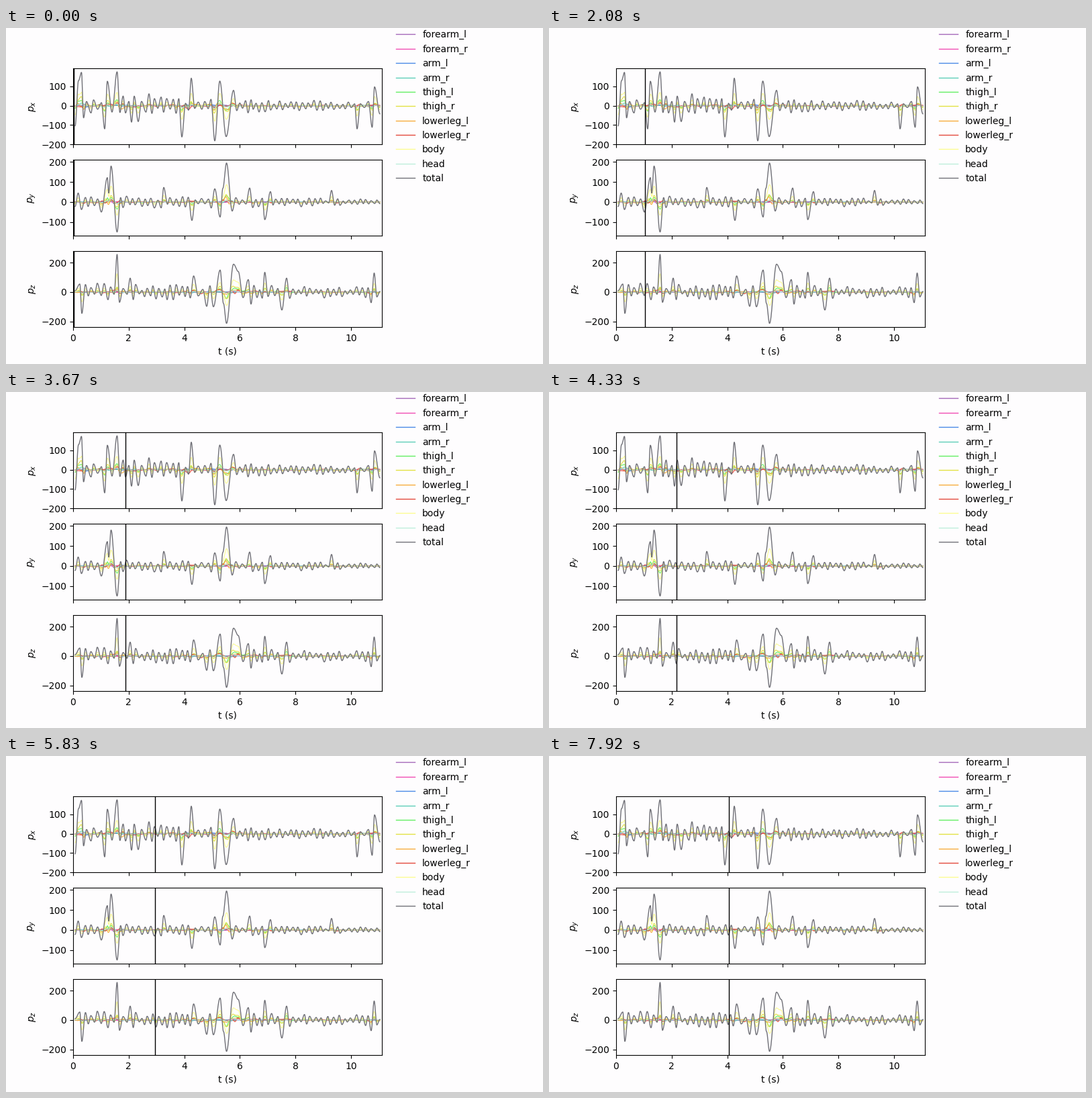
A matplotlib script for the animation above (8000 ms loop, 800 px wide and 500 px high).

```python
import numpy as np
import matplotlib.pyplot as plt
from matplotlib.animation import FuncAnimation
from matplotlib.lines import Line2D

plt.rcParams["font.family"] = "DejaVu Sans"

W, H, DPI = 800, 500, 100
FRAMES = 96
PX_PER_S = 41.4
PAPER = "#fefdfe"
TOTAL = "#707077"

# name, colour, share of the total signal, own wiggle
PARTS = [
    ("forearm_l", "#a468ba", 0.01, 1.5),
    ("forearm_r", "#f04cb4", 0.01, 1.5),
    ("arm_l", "#4a8ae6", 0.02, 2.5),
    ("arm_r", "#5ccfb8", 0.03, 2.5),
    ("thigh_l", "#62ee62", 0.14, 4),
    ("thigh_r", "#e2e244", 0.18, 4),
    ("lowerleg_l", "#f7ac3c", 0.06, 5),
    ("lowerleg_r", "#e4493c", 0.02, 5),
    ("body", "#fcfc92", 0.45, 3),
    ("head", "#bdeedb", 0.05, 2),
]

# strongest peaks: pixels from the left spine, value
PEAKS_X = [
    (3, -104), (8, 130), (12.5, 173), (15.5, -63), (47, -120), (51, 127),
    (65.5, 176), (87, -85), (97, -82), (113, 62), (162, -162), (176, 143),
    (211, -182), (218.5, 128), (228, -160), (239, 80), (423, -120),
    (445.5, -112), (449, 98), (457, -42),
]
PEAKS_Y = [
    (3, -22), (42, -50), (51, 122), (53, 45), (56.5, 180), (65.5, -150),
    (135, 73), (177, -92), (211, 66), (219, -75), (223, 68), (228.5, 195),
    (237, -45), (263, 70), (285.5, -88), (294, 52), (385, 58), (457, -8),
]
PEAKS_Z = [
    (3, 10), (10, 55), (13, -145), (65.5, 257), (69, -70), (85, 95),
    (179.5, 110), (199, -97), (209, -100), (219, 150), (224, -78),
    (228.5, -213), (239, 190), (246, 140), (261, 85), (265, -82),
    (285.5, 135), (311, -122), (318, 95), (444, -72), (448.5, 130), (457, 4),
]


def fill_gaps(peaks, ripple, rng):
    """Put alternating ripples, fading with time, between the strong peaks."""
    out = [peaks[0]]
    for (x0, v0), (x1, v1) in zip(peaks, peaks[1:]):
        extra = int((x1 - x0) / 4.1) - 1
        same_sign = (v0 > 0) == (v1 > 0)
        if (extra % 2 == 1) != same_sign:
            extra -= 1
        sign = -1 if v0 > 0 else 1
        for k in range(1, extra + 1):
            x = x0 + (x1 - x0) * (k + rng.uniform(-0.2, 0.2)) / (extra + 1)
            size = np.interp(x, (0, 457), ripple)
            out.append((x, sign * size * rng.uniform(0.2, 1)))
            sign = -sign
        out.append((x1, v1))
    return np.array(out)


def ease_between(points, x):
    """Smooth curve whose turning points are the given points."""
    px, pv = points.T
    i = np.clip(np.searchsorted(px, x, side="right") - 1, 0, len(px) - 2)
    u = (x - px[i]) / (px[i + 1] - px[i])
    return pv[i] + (pv[i + 1] - pv[i]) * (1 - np.cos(np.pi * u)) / 2


def wiggle(x, rng):
    knots = np.arange(x[0] - 5, x[-1] + 10, 4.5)
    return ease_between(np.column_stack([knots, rng.normal(0, 1, len(knots))]), x)


def draw_panel(ax, letter, peaks, ripple, ylim, ticks, seed):
    rng = np.random.default_rng(seed)
    x = np.linspace(3, 457, 1400)
    t = x / PX_PER_S
    total = ease_between(fill_gaps(peaks, ripple, rng), x)
    activity = np.convolve(np.abs(total), np.ones(60) / 60, mode="same") / 40
    for _, color, share, noise in PARTS:
        y = share * total + noise * np.minimum(activity, 1.8) * wiggle(x, rng)
        ax.plot(t, y, color=color, lw=0.8)
    ax.plot(t, total, color=TOTAL, lw=1)
    ax.set_ylim(*ylim)
    ax.set_yticks(ticks)
    ax.set_ylabel(f"$p_{letter}$")
    ax.set_facecolor(PAPER)


def draw_legend(fig):
    rows = [(name, color) for name, color, *_ in PARTS] + [("total", TOTAL)]
    for k, (name, color) in enumerate(rows):
        y = 9.4 + 21.37 * k
        fig.add_artist(Line2D([581.2 / W, 609 / W], [1 - y / H] * 2,
                              color=color, lw=1))
        fig.text(620.2 / W, 1 - (y + 4.9) / H, name, fontsize=10,
                 va="baseline")


fig, axes = plt.subplots(3, 1, sharex=True, figsize=(W / DPI, H / DPI),
                         dpi=DPI, facecolor=PAPER)
fig.subplots_adjust(left=0.125, right=0.7, bottom=0.11, top=0.88, hspace=0.2)
draw_panel(axes[0], "x", PEAKS_X, (58, 22), (-200.5, 194),
           range(-200, 101, 100), seed=3)
draw_panel(axes[1], "y", PEAKS_Y, (46, 16), (-168.5, 212),
           range(-100, 201, 100), seed=8)
draw_panel(axes[2], "z", PEAKS_Z, (62, 38), (-238, 280),
           range(-200, 201, 200), seed=5)
axes[2].set_xlim(0, 460 / PX_PER_S)
axes[2].set_xticks(range(0, 11, 2))
axes[2].set_xlabel("t (s)")
draw_legend(fig)
cursors = [ax.axvline(0, color="black", lw=1, zorder=5) for ax in axes]


def update(i):
    t = (0.5 + 1.764 * i) / PX_PER_S
    for line in cursors:
        line.set_xdata([t, t])
    return cursors


anim = FuncAnimation(fig, update, frames=FRAMES, interval=8000 / FRAMES,
                     init_func=lambda: update(0), repeat=True,
                     repeat_delay=0, blit=False)
plt.show()
```
